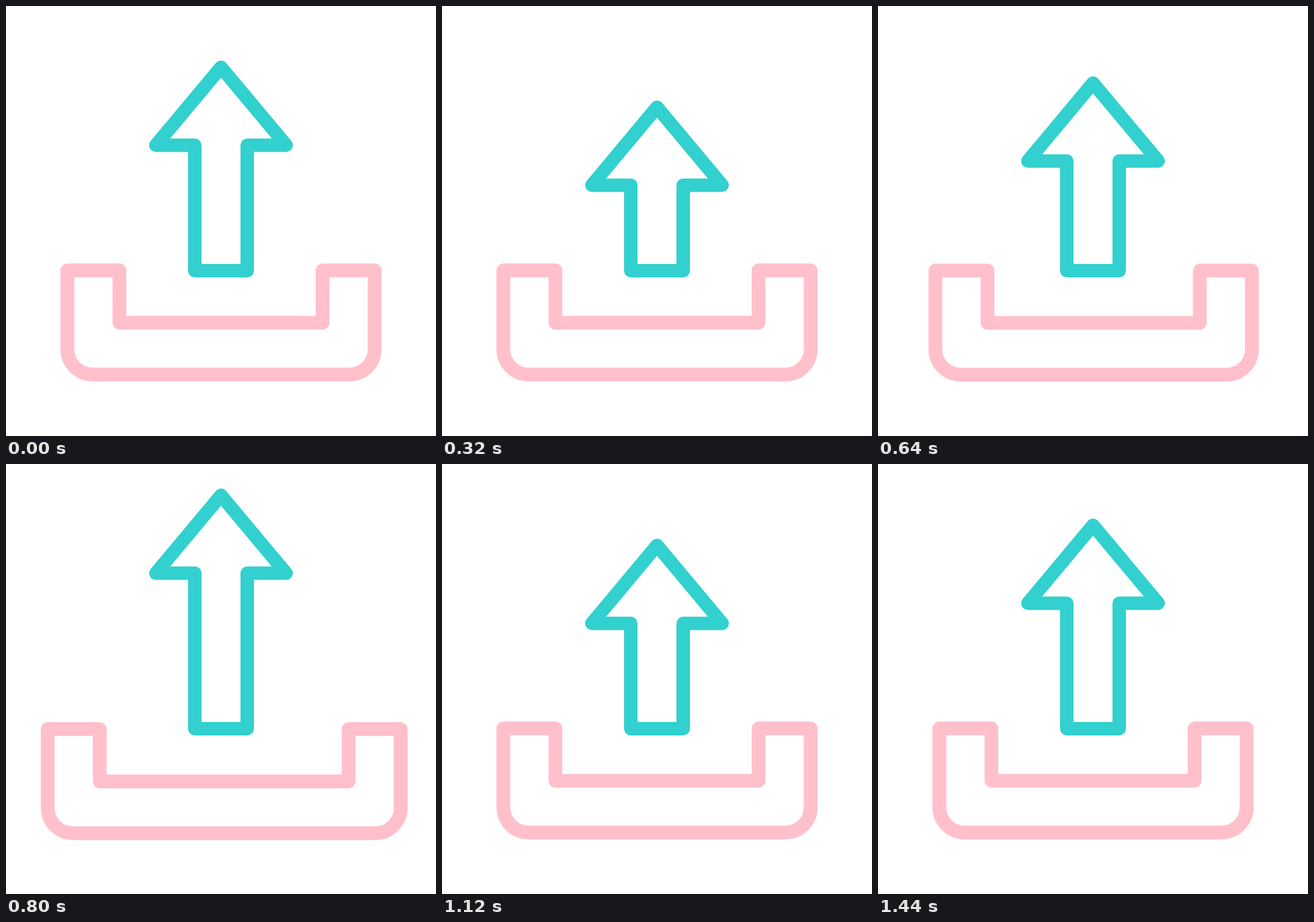
These frames come from a looping animation (640 by 640 pixels, 1480 ms). An HTML page:

```html
<!DOCTYPE html>
<html>
<head>
<meta charset="utf-8">
<style>
  html, body { margin: 0; height: 100%; overflow: hidden; background: #fff; }
  svg { display: block; width: 100vw; height: 100vh; }
  path { fill: none; stroke-linejoin: round; }
</style>
</head>
<body>
<svg viewBox="0 0 640 640">
  <path id="tray" stroke="#ffc0cb" stroke-width="20.5"/>
  <path id="arrow" stroke="#32d0cf" stroke-width="20"/>
</svg>
<script>
const LOOP = 1480, STEP = 40;
const tray = document.getElementById('tray');
const arrow = document.getElementById('arrow');

// [time in ms, value] keys, linear in between
const headKeys = [[0, 0], [18, 0], [481, 91.2], [822, -54], [1120, 30], [1440, 0], [LOOP, 0]];
const stretchKeys = [[0, 0], [600, 0], [822, 1], [1120, 0], [LOOP, 0]];

function valueAt(keys, t) {
  const i = keys.findIndex(([time]) => time > t);
  const [t0, v0] = keys[i - 1], [t1, v1] = keys[i];
  return v0 + (v1 - v0) * (t - t0) / (t1 - t0);
}

function draw(now) {
  const t = Math.floor(now % LOOP / STEP) * STEP;
  const head = valueAt(headKeys, t);
  const wing = 207.2 + head;
  arrow.setAttribute('d', `M320 ${91.2 + head}L417 ${wing}H359V394H281V${wing}H223Z`);

  const stretch = valueAt(stretchKeys, t);
  const left = 91.3 - 32.5 * stretch, right = 548.7 + 43 * stretch;
  tray.setAttribute('d', `M${left} 393.5h77.5v78H${right - 77.5}v-78H${right}V511
    a37.5 37.5 0 0 1 -37.5 37.5H${left + 37.5}a37.5 37.5 0 0 1 -37.5 -37.5Z`);
  tray.setAttribute('transform', `translate(0 ${stretch})`);
  requestAnimationFrame(draw);
}
requestAnimationFrame(draw);
</script>
</body>
</html>
```
